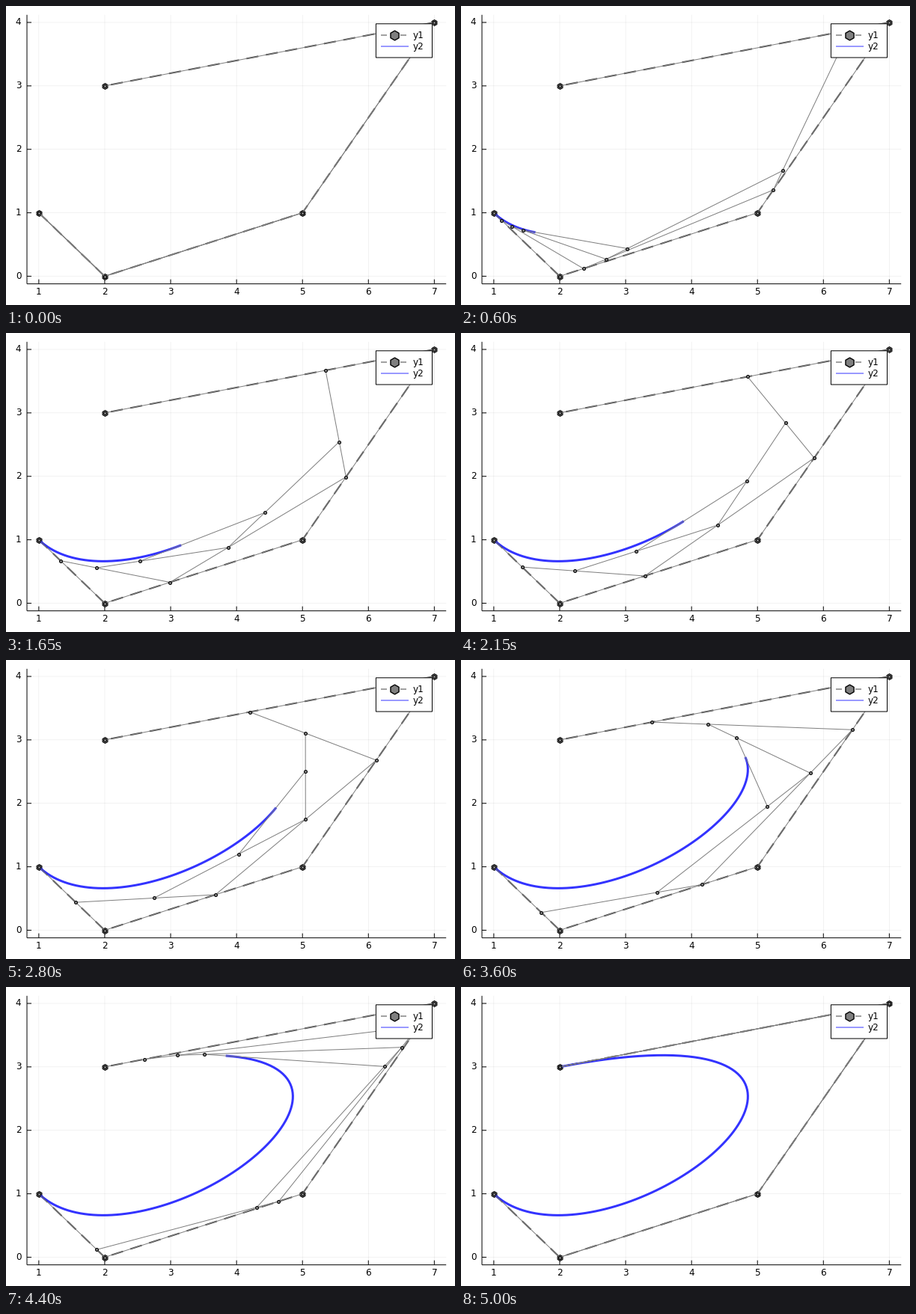
Animation, 600 px wide and 400 px high, one loop 5.05 s. Source, as a matplotlib script:

```python
import numpy as np
import matplotlib.pyplot as plt
from matplotlib.animation import FuncAnimation
from matplotlib.patches import Rectangle

W, H, DPI = 600, 400, 100
PX = 72 / DPI            # one pixel in points
STEPS = 100
FONT = dict(family="DejaVu Sans", size=12 * PX, color="black")
DARK, GRAY = "#444444", "#7f7f7f"
BLUE = (0, 0, 1, 0.8)
DASH = (0, (8.11, 5.07))

CONTROL = np.array([(1, 1), (2, 0), (5, 1), (7, 4), (2, 3)], float)
LEFT, RIGHT, TOP, BOTTOM = 28.0, 588.2, 11.8, 371.7
XLIM, YLIM = (0.82, 7.18), (-0.12, 4.12)


def casteljau(t):
    """All levels of the construction, from the polygon to the curve point."""
    levels = [CONTROL]
    while len(levels[-1]) > 1:
        p = levels[-1]
        levels.append((1 - t) * p[:-1] + t * p[1:])
    return levels


def pixel_axes(zorder):
    axes = fig.add_axes([0, 0, 1, 1], zorder=zorder)
    axes.set_xlim(0, W)
    axes.set_ylim(H, 0)
    axes.axis("off")
    return axes


def stroke(axes, xs, ys, color="black", width=1, **style):
    line, = axes.plot(xs, ys, color=color, lw=width * PX,
                      solid_capstyle="butt", **style)
    line.set_snap(False)
    return line


def dots(axes, points, shape, radius, edge=1, zorder=3):
    # scatter keeps sub-pixel positions, unlike line markers
    return axes.scatter(*np.transpose(points), marker=shape, s=(2 * radius * PX) ** 2,
                        facecolor=GRAY, edgecolor="black", linewidth=edge * PX,
                        zorder=zorder)


fig = plt.figure(figsize=(W / DPI, H / DPI), dpi=DPI, facecolor="white")

# Grid, axes and tick labels
base = pixel_axes(0)
x_scale = (RIGHT - LEFT) / (XLIM[1] - XLIM[0])
y_scale = (BOTTOM - TOP) / (YLIM[1] - YLIM[0])
for n in range(1, 8):
    x = LEFT + (n - XLIM[0]) * x_scale
    stroke(base, [x, x], [TOP, BOTTOM], width=0.5, alpha=0.1)
    stroke(base, [x, x], [BOTTOM, BOTTOM - 6])
    base.text(x, 383, str(n), ha="center", va="center", **FONT)
for n in range(5):
    y = BOTTOM - (n - YLIM[0]) * y_scale
    stroke(base, [LEFT, RIGHT], [y, y], width=0.5, alpha=0.1)
    stroke(base, [LEFT, LEFT + 6], [y, y])
    base.text(20.3, y, str(n), ha="right", va="center", **FONT)
stroke(base, [LEFT, RIGHT], [BOTTOM, BOTTOM])
stroke(base, [LEFT, LEFT], [TOP, BOTTOM])

# Control polygon, curve and construction lines
ax = fig.add_axes([LEFT / W, 1 - BOTTOM / H, (RIGHT - LEFT) / W, (BOTTOM - TOP) / H],
                  zorder=1)
ax.axis("off")
stroke(ax, *CONTROL.T, color=DARK, width=2, ls=DASH, zorder=3)
dots(ax, CONTROL, "h", 4, zorder=3.1)
curve = stroke(ax, [], [], color=BLUE, width=3, zorder=4, solid_joinstyle="round")
struts = []
for k, level in enumerate(casteljau(0)[:-1]):
    struts.append((stroke(ax, *level.T, color=GRAY, zorder=5 + k),
                   dots(ax, level, "o", 2, zorder=5.5 + k)))
ax.set_xlim(XLIM)
ax.set_ylim(YLIM)

# Legend
top = pixel_axes(2)
top.add_patch(Rectangle((494.4, 23.8), 75.1, 45.2, facecolor="white",
                        edgecolor="black", linewidth=PX, snap=False))
stroke(top, [501, 538], [39, 39], color=DARK, ls=(0, (8, 5)))
dots(top, [(519.3, 39)], "h", 6.4, 1.4)
stroke(top, [501, 538], [54, 54], color=BLUE)
top.text(543.7, 43.3, "y1", va="baseline", **FONT)
top.text(543.7, 58.3, "y2", va="baseline", **FONT)

trace = np.array([casteljau(i / STEPS)[-1][0] for i in range(STEPS + 1)])


def draw(i):
    curve.set_data(*trace[:i + 1].T)
    for (line, joints), points in zip(struts, casteljau(i / STEPS)):
        line.set_data(*points.T)
        joints.set_offsets(points)
    return [curve]


anim = FuncAnimation(fig, draw, frames=STEPS + 1, interval=50,
                     repeat=True, repeat_delay=0, init_func=lambda: draw(0))
plt.show()
```
